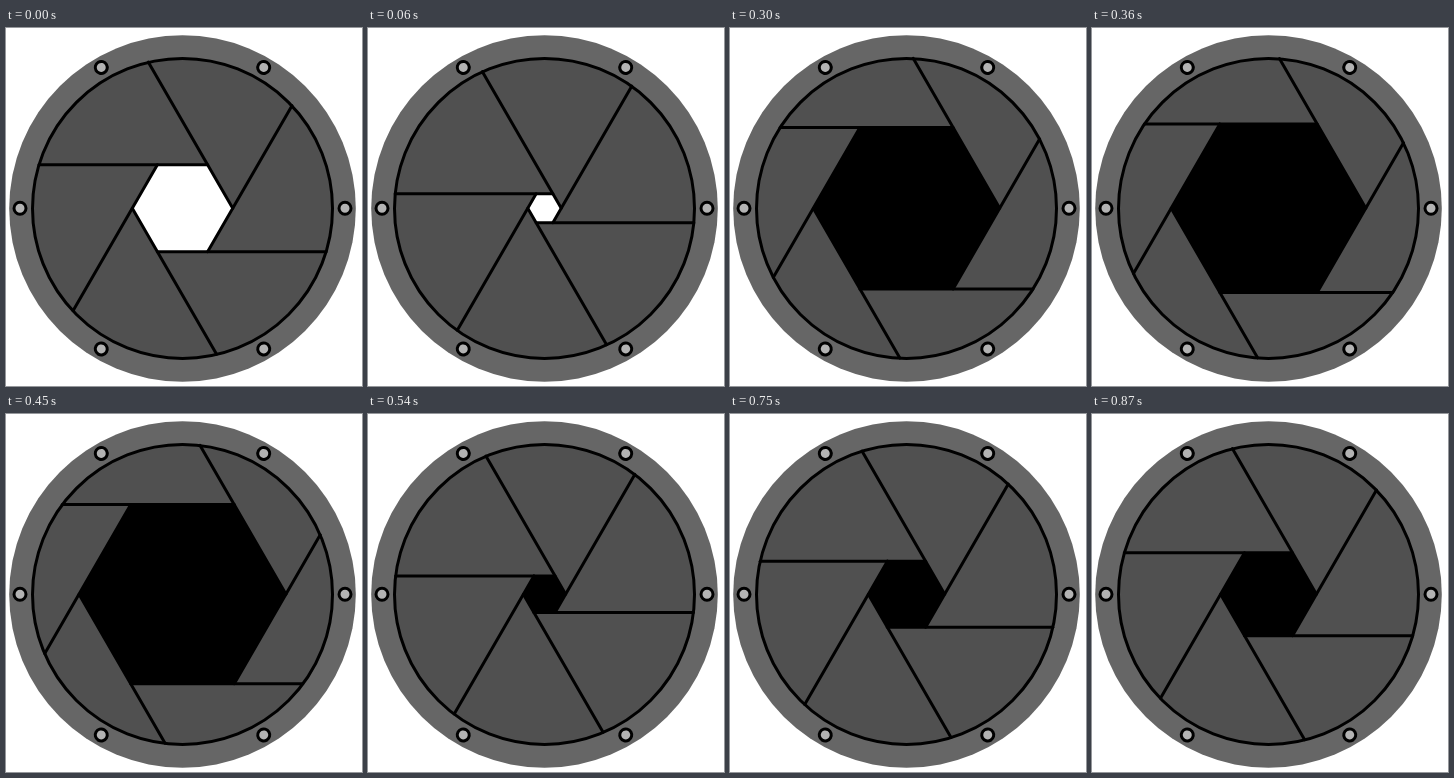
Recreate the animation shown at these times as an HTML page with a canvas. Size 356 px wide and 358 px high, loop 900 ms.

```html
<!DOCTYPE html>
<html lang="en">
<head>
<meta charset="utf-8">
<title>Camera shutter</title>
<style>
html, body { margin: 0; width: 100%; height: 100%; overflow: hidden; background: #fff; }
canvas { display: block; }
</style>
</head>
<body>
<canvas id="stage" width="356" height="358"></canvas>
<script>
const ctx = document.getElementById('stage').getContext('2d');
const LOOP = 900, STEP = 30, SHUT = 90;
const IRIS = 150;
// [time in ms, distance from the centre to each blade edge]
const keys = [[0, 43.5], [SHUT, 0], [180, 43.7], [300, 80.7], [450, 89.6], [540, 18.3], [900, 43.6]];

function openingAt(t) {
  const i = keys.findIndex(([end]) => end > t);
  const [t0, a0] = keys[i - 1], [t1, a1] = keys[i];
  return a0 + (a1 - a0) * (t - t0) / (t1 - t0);
}

function disc(x, y, r, fill, outlined) {
  ctx.beginPath();
  ctx.arc(x, y, r, 0, 2 * Math.PI);
  ctx.fillStyle = fill;
  ctx.fill();
  if (outlined) ctx.stroke();
}

function sixTimes(draw) {
  for (let i = 0; i < 6; i++) {
    ctx.save();
    ctx.rotate(i * Math.PI / 3);
    draw();
    ctx.restore();
  }
}

function drawHole(opening, fill) {
  const radius = opening / Math.cos(Math.PI / 6);
  ctx.beginPath();
  for (let i = 0; i < 6; i++) {
    const angle = i * Math.PI / 3;
    ctx.lineTo(radius * Math.cos(angle), radius * Math.sin(angle));
  }
  ctx.fillStyle = fill;
  ctx.fill();
}

function drawBladeEdge(opening) {
  ctx.beginPath();
  ctx.moveTo(opening * Math.tan(Math.PI / 6), -opening);
  ctx.lineTo(-Math.sqrt(IRIS ** 2 - opening ** 2), -opening);
  ctx.stroke();
}

function frame(now) {
  const t = Math.floor(now % LOOP / STEP) * STEP;
  const opening = openingAt(t);
  ctx.setTransform(1, 0, 0, 1, 0, 0);
  ctx.clearRect(0, 0, 356, 358);
  ctx.translate(176.5, 180.2);
  ctx.lineWidth = 3;
  ctx.lineCap = 'round';
  disc(0, 0.3, 173.3, '#666');
  disc(0, 0.2, IRIS, '#505050', true);
  drawHole(opening, t < SHUT ? '#fff' : '#000');
  sixTimes(() => {
    drawBladeEdge(opening);
    disc(162.5, 0, 6, '#b3b3b3', true);
  });
  requestAnimationFrame(frame);
}

const start = performance.now();
requestAnimationFrame(now => frame(Math.max(0, now - start)));
</script>
</body>
</html>
```
